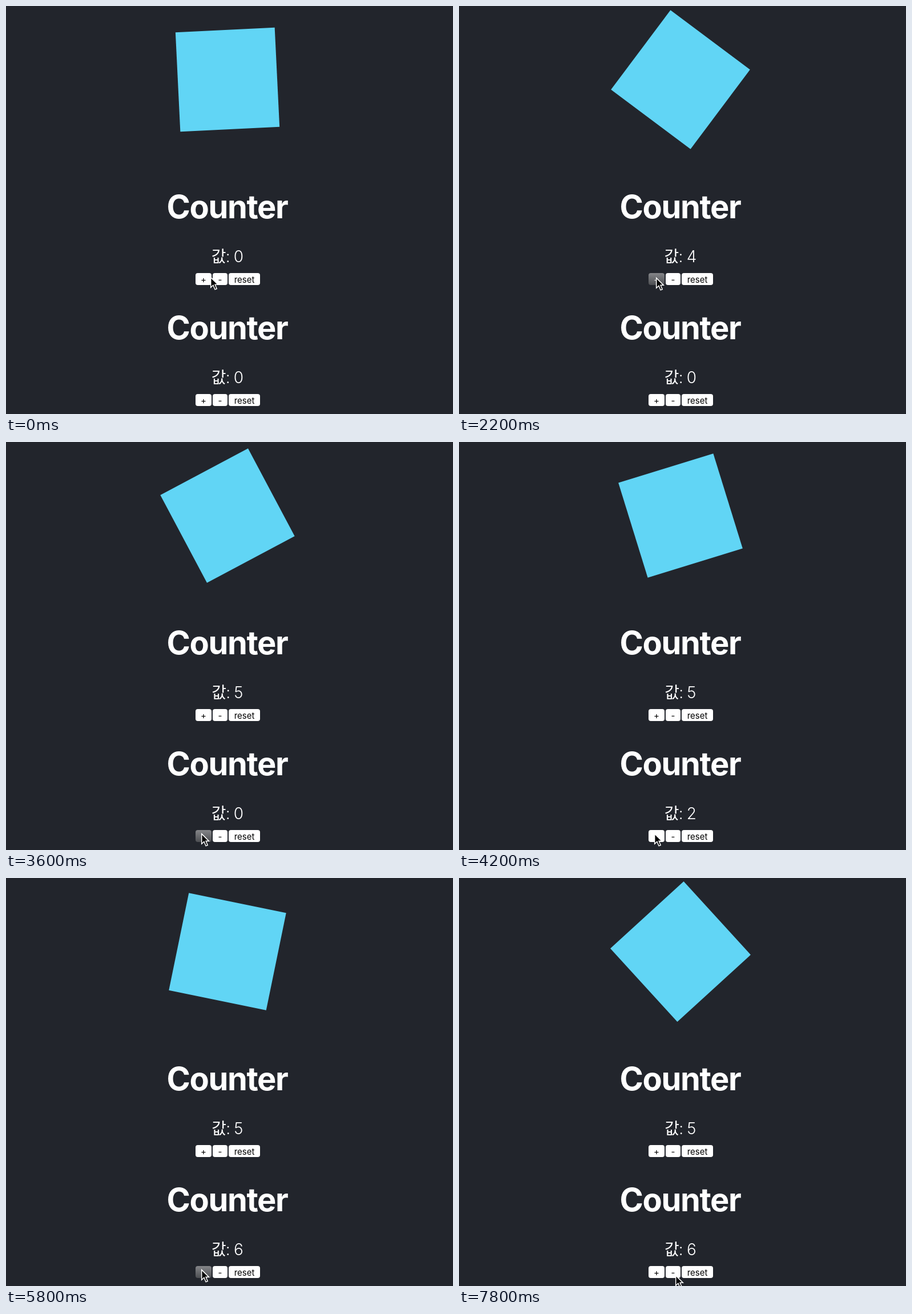
An HTML page for the animation above (8000 ms loop, 783 by 715 pixels).

```html
<!DOCTYPE html>
<html lang="ko">
<head>
<meta charset="utf-8">
<title>Counter</title>
<style>
  html, body { margin: 0; width: 100%; height: 100%; overflow: hidden; background: #22252c; }
  svg { display: block; width: 100%; height: 100%; }
  text { font-family: Inter, "Noto Sans CJK KR", "Noto Sans CJK", sans-serif; text-anchor: middle; fill: #fff; }
  .title { font-size: 56px; font-weight: 700; letter-spacing: -1.4px; }
  .value { font-size: 28px; font-weight: 350; letter-spacing: -0.8px; }
  .button rect { fill: #fff; }
  .button text { font-size: 15px; fill: #000; }
  .button.pressed rect { fill: url(#pressed); }
  .button.pressed text { fill: #ddd; }
</style>
</head>
<body>
<svg id="stage" viewBox="0 0 783 715">
  <defs>
    <linearGradient id="pressed" x1="0" y1="0" x2="0" y2="1">
      <stop offset="0" stop-color="#858689"/>
      <stop offset="1" stop-color="#4c4e52"/>
    </linearGradient>
  </defs>
  <rect id="emblem" x="-87" y="-87" width="174" height="174" fill="#61d5f5"/>
  <g id="counters"></g>
  <path id="cursor" d="M.7 1.6V19.2L4.9 15.3L8.1 22.8L11.2 21.5L8.1 14.2H13.3Z"
        fill="#000" stroke="#fff" stroke-width="1.5"/>
</svg>
<script>
const LOOP = 8000, STEP = 200, HOLD = 200;

// Runs of clicks: a press begins every `period` ms and counts on release.
const clicks = [
  { counter: 0, button: 0, start: 600, period: 400, count: 5, delta: 1 },
  { counter: 1, button: 0, start: 3600, period: 350, count: 8, delta: 1 },
  { counter: 1, button: 1, start: 7200, period: 400, count: 2, delta: -1 }
];

// time, x, y
const cursorPath = [
  [0, 358, 474], [400, 345, 475], [2450, 345, 475], [3400, 342, 685],
  [6250, 342, 685], [6600, 380, 618], [7050, 379, 695], [LOOP, 379, 695]
];

const buttonShapes = [
  { label: '+', x: 332, width: 28 },
  { label: '-', x: 362, width: 26 },
  { label: 'reset', x: 390, width: 55 }
];

function add(parent, tag, attributes, content = '') {
  const node = document.createElementNS('http://www.w3.org/2000/svg', tag);
  for (const [key, value] of Object.entries(attributes)) node.setAttribute(key, value);
  node.textContent = content;
  return parent.appendChild(node);
}

function makeCounter(top) {
  const group = add(document.getElementById('counters'), 'g', { transform: `translate(0 ${top})` });
  add(group, 'text', { class: 'title', x: 387.5, y: 372 }, 'Counter');
  const value = add(group, 'text', { class: 'value', x: 387.5, y: 449 });
  const buttons = buttonShapes.map(({ label, x, width }) => {
    const button = add(group, 'g', { class: 'button' });
    add(button, 'rect', { x, y: 468, width, height: 21, rx: 4 });
    add(button, 'text', { x: x + width / 2, y: 484.5 }, label);
    return button;
  });
  return { value, buttons };
}

const counters = [0, 212].map(makeCounter);
const emblem = document.getElementById('emblem');
const cursor = document.getElementById('cursor');

function cursorAt(time) {
  const next = cursorPath.findIndex(point => point[0] > time);
  const [t0, x0, y0] = cursorPath[next - 1];
  const [t1, x1, y1] = cursorPath[next];
  const p = (time - t0) / (t1 - t0);
  const ease = p * p * (3 - 2 * p);
  return [x0 + (x1 - x0) * ease, y0 + (y1 - y0) * ease];
}

function draw(time) {
  const values = [0, 0];
  const held = new Set();
  for (const { counter, button, start, period, count, delta } of clicks) {
    const elapsed = time - start;
    const released = Math.floor((elapsed - HOLD) / period) + 1;
    values[counter] += delta * Math.max(0, Math.min(count, released));
    if (elapsed >= 0 && elapsed < count * period && elapsed % period < HOLD) {
      held.add(counters[counter].buttons[button]);
    }
  }
  counters.forEach(({ value, buttons }, i) => {
    value.textContent = `값: ${values[i]}`;
    buttons.forEach(button => button.classList.toggle('pressed', held.has(button)));
  });
  emblem.setAttribute('transform', `translate(388 129) rotate(${-2.8 + time * 0.018})`);
  cursor.setAttribute('transform', `translate(${cursorAt(time)})`);
}

function tick() {
  const time = performance.now() % LOOP;
  draw(Math.floor(time / STEP) * STEP);
  requestAnimationFrame(tick);
}
tick();
</script>
</body>
</html>
```
